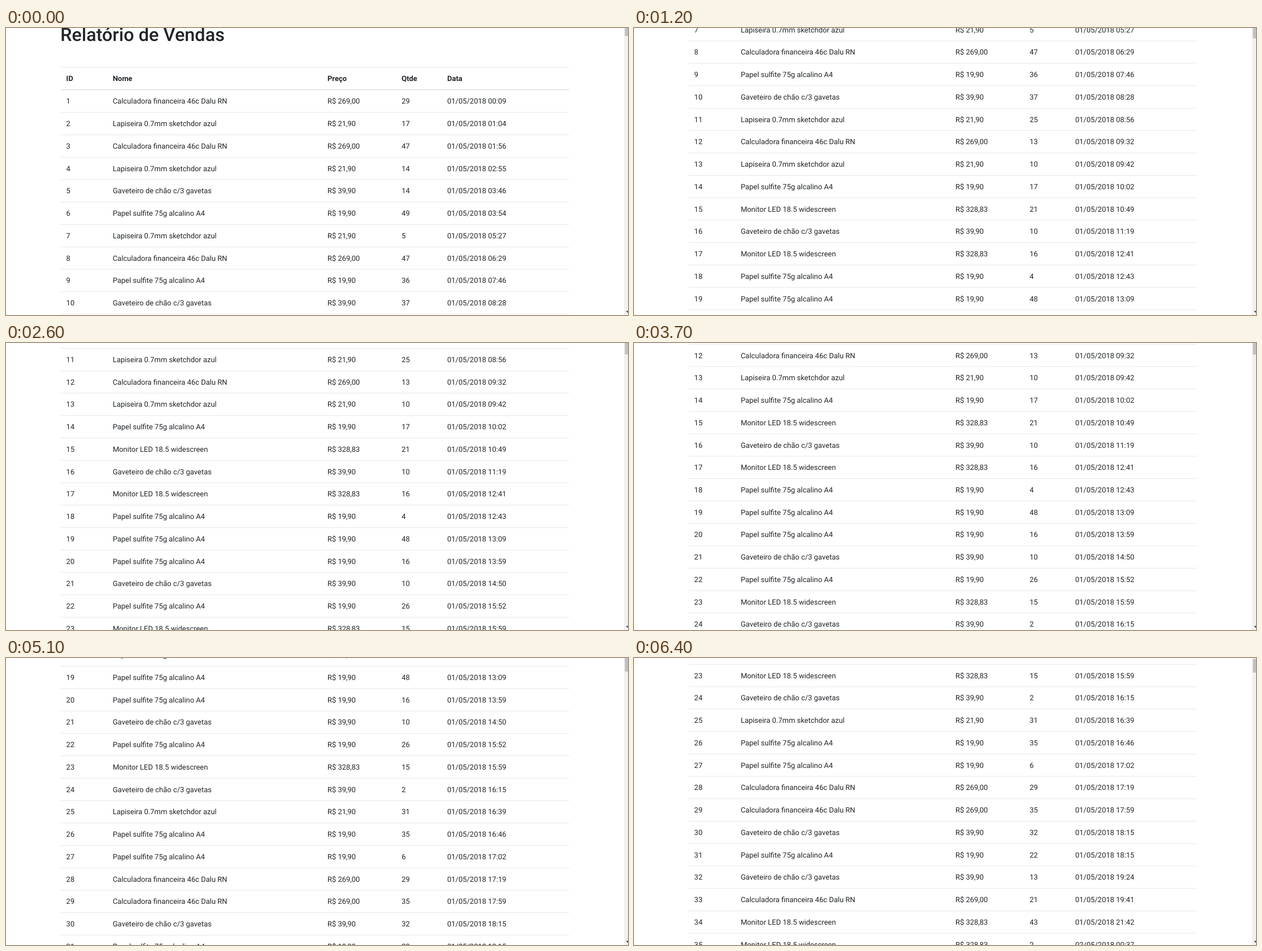
Recreate the animation shown at these times as an HTML page with a canvas. Size 1101 by 509 pixels, loop 7100 ms.

```html
<!DOCTYPE html>
<html lang="pt-BR">
<head>
<meta charset="utf-8">
<title>Relatório de Vendas</title>
<style>
  html, body { margin: 0; width: 100%; height: 100%; overflow: hidden; background: #fff; }
  canvas { display: block; width: 1101px; height: 509px; }
</style>
</head>
<body>
<canvas id="stage" width="1101" height="509"></canvas>
<script>
const ctx = document.getElementById('stage').getContext('2d');
const W = 1101, H = 509, LOOP = 7100;
const ZOOM = 0.811;               // page zoom
const PITCH = 49 * ZOOM;          // row height
const LEFT = 96.9, RIGHT = 996.8;
const HEAD_Y = 89.4, FIRST_Y = HEAD_Y + 50 * ZOOM;
const COLS = [106.6, 188.9, 568.9, 700.2, 781];
const FONT = 'Roboto, "Open Sans", sans-serif';
const INK = '#212529', RULE = '#dee2e6';

const PRODUCTS = {
  C: ['Calculadora financeira 46c Dalu RN', '269,00'],
  L: ['Lapiseira 0.7mm sketchdor azul', '21,90'],
  G: ['Gaveteiro de chão c/3 gavetas', '39,90'],
  P: ['Papel sulfite 75g alcalino A4', '19,90'],
  M: ['Monitor LED 18.5 widescreen', '328,83']
};

// product, quantity, time of sale
const SALES = `C 29 00:09|L 17 01:04|C 47 01:56|L 14 02:55|G 14 03:46|P 49 03:54
L 5 05:27|C 47 06:29|P 36 07:46|G 37 08:28|L 25 08:56|C 13 09:32
L 10 09:42|P 17 10:02|M 21 10:49|G 10 11:19|M 16 12:41|P 4 12:43
P 48 13:09|P 16 13:59|G 10 14:50|P 26 15:52|M 15 15:59|G 2 16:15
L 31 16:39|P 35 16:46|P 6 17:02|C 29 17:19|C 35 17:59|G 32 18:15
P 22 18:15|G 13 19:24|C 21 19:41|M 43 21:42|M 2 00:37`;

const rows = SALES.split(/[|\n]/).map((sale, i) => {
  const [key, qty, time] = sale.split(' ');
  const [name, price] = PRODUCTS[key];
  const day = i < 34 ? '01' : '02';
  return [String(i + 1), name, 'R$ ' + price, qty, `${day}/05/2018 ${time}`];
});

// Scroll gestures: start time, then the offset reached on each 100 ms tick
const GESTURES = [
  [400, 33],
  [900, 82, 172, 270, 365.2, 405, 424],
  [1700, 433, 440],
  [2400, 458, 482, 497.9],
  [3700, 545, 595],
  [4000, 650],
  [4300, 697.2, 718.5],
  [4700, 775],
  [5100, 810.8],
  [5300, 827],
  [5600, 844, 862, 879, 895, 908.9, 926, 944, 961],
  [6400, 973]
];

function scrollAt(t) {
  let y = 0;
  for (const [start, ...stops] of GESTURES) {
    if (t < start) break;
    y = stops[Math.min(stops.length - 1, Math.floor((t - start) / 100))];
  }
  return y;
}

function rule(y, weight) {
  ctx.fillStyle = RULE;
  ctx.fillRect(LEFT, y - weight * ZOOM / 2, RIGHT - LEFT, weight * ZOOM);
}

function cells(texts, y, weight) {
  ctx.font = `${weight} ${16 * ZOOM}px ${FONT}`;
  ctx.fillStyle = INK;
  texts.forEach((text, i) => ctx.fillText(text, COLS[i], y + 4.5));
}

function drawTable(scroll) {
  const headY = HEAD_Y - scroll;
  if (headY > -100) {
    ctx.font = `500 ${40 * ZOOM}px ${FONT}`;
    ctx.fillStyle = INK;
    ctx.fillText('Relatório de Vendas', LEFT - 0.6, 23.2 - scroll);
    rule(headY - 24.5 * ZOOM, 1);
    cells(['ID', 'Nome', 'Preço', 'Qtde', 'Data'], headY, 700);
    rule(headY + 24.8 * ZOOM, 2);
  }
  rows.forEach((row, i) => {
    const y = FIRST_Y + i * PITCH - scroll;
    if (y < -30 || y > H + 20) return;
    cells(row, y, 400);
    rule(y + 24.4 * ZOOM, 1);
  });
}

function drawScrollbar(scroll) {
  ctx.fillStyle = '#f1f1f1';
  ctx.fillRect(1094, 0, W - 1094, H);
  ctx.fillStyle = '#c1c1c1';
  ctx.fillRect(1095.4, -10.4 + scroll * 0.0123, W - 1095, 24.4);
  ctx.fillStyle = '#404040';
  ctx.beginPath();
  ctx.moveTo(1097.2, 501.7);
  ctx.lineTo(1104.4, 501.7);
  ctx.lineTo(1100.8, 505.3);
  ctx.fill();
}

function frame() {
  const scroll = scrollAt(performance.now() % LOOP);
  ctx.textRendering = 'geometricPrecision';
  ctx.fillStyle = '#fff';
  ctx.fillRect(0, 0, W, H);
  drawTable(scroll);
  drawScrollbar(scroll);
  requestAnimationFrame(frame);
}
frame();
</script>
</body>
</html>
```
